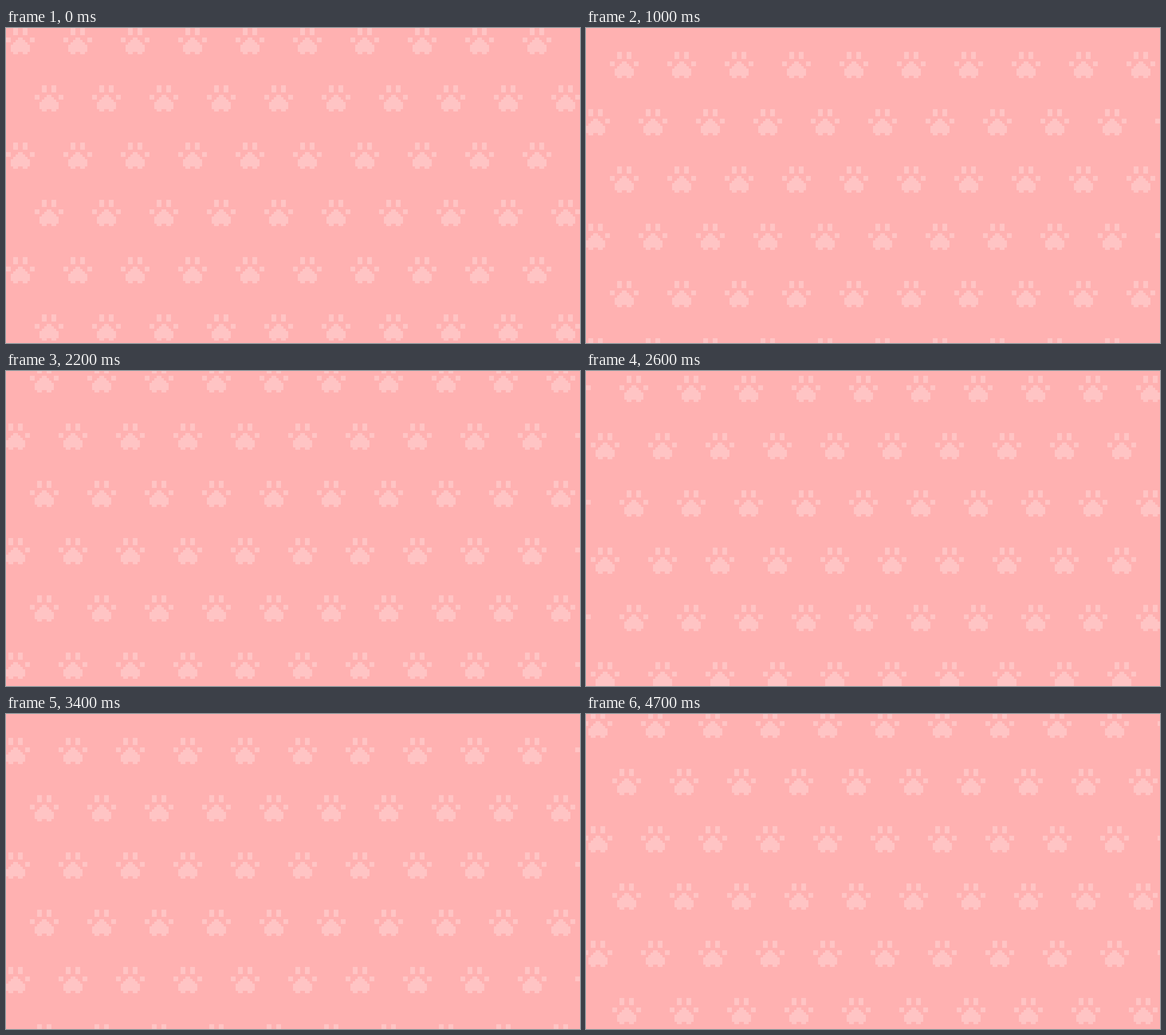
An HTML page with a canvas for the animation above (4.8 s loop, 960 by 528 pixels).

```html
<!DOCTYPE html>
<html lang="en">
<head>
<meta charset="utf-8">
<title>Drifting paws</title>
<style>
html, body { margin: 0; width: 100%; height: 100%; overflow: hidden; background: #ffb1b1; }
canvas { display: block; }
</style>
</head>
<body>
<canvas id="stage" width="960" height="528"></canvas>
<script>
const ctx = document.getElementById('stage').getContext('2d');
const CELL = 4, GAP = 96, LOOP = 4800, STEP = 100;
const PAW = [
  '...##..##...',
  '...##..##...',
  '...##..##...',
  '............',
  '##...##...##',
  '##..####..##',
  '...######...',
  '..########..',
  '..########..',
  '..########..',
  '...##..##...'
];

function drawPaw(x, y) {
  PAW.forEach((line, row) => [...line].forEach((c, col) => {
    if (c === '#') ctx.fillRect(x + col * CELL, y + row * CELL, CELL, CELL);
  }));
}

function draw(time) {
  const shift = Math.floor((time % LOOP) / STEP) * CELL;
  ctx.fillStyle = '#ffb1b1';
  ctx.fillRect(0, 0, 960, 528);
  ctx.fillStyle = '#ffc4c4';
  // Odd rows sit half a gap to the right.
  for (let row = -3; row < 6; row++) {
    const stagger = row % 2 ? GAP / 2 : 0;
    const left = (stagger + shift) % GAP - GAP;
    for (let x = left; x < 960; x += GAP) drawPaw(x, row * GAP + shift);
  }
}

const start = performance.now();
function tick() {
  draw(performance.now() - start);
  requestAnimationFrame(tick);
}
tick();
</script>
</body>
</html>
```
